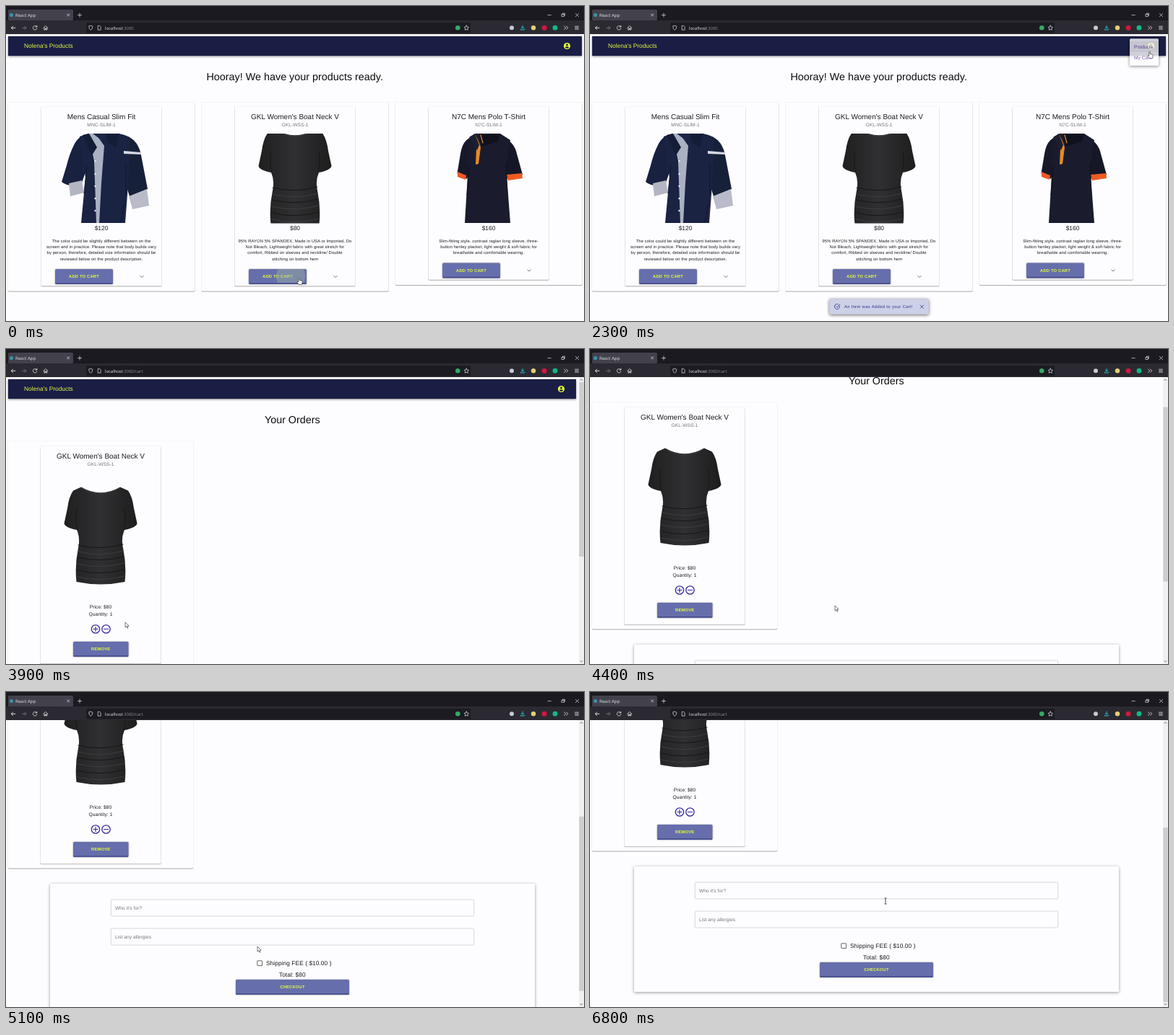
Animation of 800x437 px, one loop 6.9 s. Source, as an HTML page:

```html
<!DOCTYPE html>
<html lang="en">
<head>
<meta charset="utf-8">
<title>Shop demo</title>
<style>
  html, body { margin: 0; width: 100%; height: 100%; overflow: hidden; background: #fdfdff; }
  svg { display: block; width: 100vw; height: 100vh; }
  text { font-family: "Liberation Sans", Arial, sans-serif; text-rendering: geometricPrecision; white-space: pre; }
  .ui { font-family: "Open Sans", "Noto Sans", sans-serif; }
  .form { fill: #fdfdff; filter: drop-shadow(0 1px 2px rgba(0, 0, 0, .4)); }
  .bar { fill: #1a1e45; filter: drop-shadow(0 1px 1.5px rgba(0, 0, 0, .5)); }
  .btn { fill: #666fac; filter: drop-shadow(0 .8px 1px rgba(0, 0, 0, .4)); }
  .pop { filter: drop-shadow(0 1.6px 2.2px rgba(0, 0, 0, .6)); }
  .line { fill: none; stroke-linecap: round; stroke-linejoin: round; }
</style>
</head>
<body>
<svg id="stage" viewBox="0 0 800 437" preserveAspectRatio="none" xmlns="http://www.w3.org/2000/svg"></svg>
<script>
const LOOP = 6900, STEP = 100;
const LIME = '#e2f93c', INK = '#1d1d20', GREY = '#77777b';

const text = (s, x, y, size, fill = INK, extra = '') =>
  `<text x="${x}" y="${y}" font-size="${size}" fill="${fill}" ${extra}>${s}</text>`;
const mid = (s, x, y, size, fill = INK, extra = '') =>
  text(s, x, y, size, fill, `text-anchor="middle" ${extra}`);
const rect = (x, y, w, h, attrs = '') =>
  `<rect x="${x}" y="${y}" width="${w}" height="${h}" ${attrs}/>`;
const dot = (x, y, r, fill) => `<circle cx="${x}" cy="${y}" r="${r}" fill="${fill}"/>`;
const line = (d, color, w = .9) => `<path class="line" d="${d}" stroke="${color}" stroke-width="${w}"/>`;
const shape = (d, fill) => `<path d="${d}" fill="${fill}"/>`;

// Card with a faint edge and a firmer shadow below
const paper = (x, y, w, h) =>
  rect(x - .5, y - .2, w + 1, h + 1.4, 'rx="1.6" fill="#000" opacity=".1"') +
  rect(x, y + 2, w, h - 1.1, 'rx="1.4" fill="#000" opacity=".22"') +
  rect(x, y, w, h, 'rx="1.4" fill="#fdfdff"');

const button = (label, x, y, w, h = 21) =>
  rect(x, y, w, h, 'rx="1.6" class="btn"') +
  rect(x + .4, y + h - 2, w - .8, 1.8, 'rx="1" fill="#49518f"') +
  mid(label, x + w / 2, y + 12.4, 5.83, LIME, 'font-weight="bold" letter-spacing=".17"');

const account = (x, y) =>
  dot(x, y, 4.6, LIME) + dot(x, y - 1.5, 1.4, '#1a1e45') +
  shape(`M${x - 2.8} ${y + 2.1}Q${x} ${y - .5} ${x + 2.8} ${y + 2.1}Q${x} ${y + 4.6} ${x - 2.8} ${y + 2.1}Z`, '#1a1e45');

const appBar = right =>
  rect(3, 42, right - 3, 27, 'class="bar"') +
  text("Nolena's Products", 25, 58.4, 8.4, LIME) + account(right - 20.5, 55.5);

// Garments
const jacket = `
  ${shape('M104 181C95 186 89 203 84 221L77 244Q87 252 104 248L113 222Z', '#182140')}
  ${shape('M160 178C177 182 184 192 187 207L196 254 171 264 160 228Z', '#172039')}
  ${shape('M102 181L114 177H157L171 182 170 235 165 301H104L110 238Z', '#1a2342')}
  ${shape('M87 246L105 242 108 259 89 264Z', '#b3b6c2')}
  ${shape('M170 264L195 254 198 277 175 282Z', '#b9bcc8')}
  ${shape('M114 177H124L136 194 132 245 129 301H125L122 215Z', '#aab1c2')}
  ${shape('M120 177H138L135 188Z', '#1b2546')}
  ${shape('M106 179L115 177 126 196 119 207Z', '#141c36')}
  ${shape('M138 177H156L152 196 141 188Z', '#141c36')}
  ${shape('M163 201L187 203 187 206 163 205Z', '#d5d8e2')}
  ${line('M112 222L108 260M166 220L166 262M160 298L163 275', '#0e152b', .9)}
  ${[215, 233, 250, 267, 284].map(y => dot(123.5, y, 1.2, '#e6e8ee')).join('')}`;

const folds = [272, 281, 289, 298, 307, 316]
  .map((y, i) => line(`M${100 - i * .3} ${y}Q131 ${y + 8} ${162 + i * .3} ${y - 1}`, i % 2 ? '#3d3d3f' : '#161617', 1)).join('');
const blouse = `
  ${shape('M104 191.5Q131 207 158 191.5L169 196.5Q175 205 177 221L181.5 242Q180 248 164 251Q159 262 162 276Q167 300 164.5 323Q131 330 97.5 323Q95 300 100 276Q103 262 98 251Q82 248 80.5 242L85 221Q87 205 93 196.5Z', 'url(#cloth)')}
  ${line('M104.5 192.5Q131 208 157.5 192.5', '#49494b', .8)}
  ${line('M99 250Q95 236 98 222M163 250Q167 236 164 222', '#171718', 1)}
  ${folds}`;

const polo = `
  ${shape('M644 182Q632 186 629 205L624.5 232 638 240 648 212Z', '#17192a')}
  ${shape('M686 182Q703 187 707 205L715 234 694 240 684 214Z', '#151727')}
  ${shape('M640 185L650 177H684L698 186 692 222 698 301H635L639 235Z', '#1a1c2d')}
  ${shape('M625 230L637 235 636 241 625 237Z', '#ee5a22')}
  ${shape('M693 234L714 232 715 239 695 242Z', '#ee5a22')}
  ${shape('M650 179L655 190 657 196 654 219 650 220 651 198Z', '#e58a2c')}
  ${shape('M641 182L649 177 655 193 652 200Z', '#1d1f31')}
  ${shape('M655 177H684L681 188 659 195Z', '#10111f')}
  ${line('M657 179L660 190', '#e58a2c', 1.2)}
  ${line('M641 222L638 262M692 222L694 262', '#0d0e18', .8)}`;

// Product page
const products = [
  { x: 3, h: 263, name: 'Mens Casual Slim Fit', code: 'MNC-SLIM-1', price: '$120', art: jacket,
    about: ['The color could be slightly different between on the', 'screen and in practice. Please note that body builds vary',
      'by person, therefore, detailed size information should be', 'reviewed below on the product description.'] },
  { x: 271, h: 263, name: "GKL Women's Boat Neck V", code: 'GKL-WSS-1', price: '$80',
    art: `<g transform="translate(269 -20)">${blouse}</g>`,
    about: ['95% RAYON 5% SPANDEX, Made in USA or Imported, Do', 'Not Bleach, Lightweight fabric with great stretch for',
      'comfort, Ribbed on sleeves and neckline/ Double', 'stitching on bottom hem'] },
  { x: 539, h: 254.5, name: 'N7C Mens Polo T-Shirt', code: 'N7C-SLIM-1', price: '$160', art: polo,
    about: ['Slim-fitting style, contrast raglan long sleeve, three-', 'button henley placket, light weight &amp; soft fabric for',
      'breathable and comfortable wearing.'] }
];

function productCard({ x, h, name, code, price, art, about }) {
  const c = x + 129, by = 102 + h;
  return paper(x, 133.5, 258.5, h - 1) + paper(x + 45.7, 139.3, 166.5, h - 14) +
    mid(name, c, 156.6, 10) + mid(code, c, 166.6, 6.67, GREY, 'letter-spacing=".06"') +
    `<g clip-path="url(#photo)">${art}</g>` + mid(price, c, 311, 8.4) +
    about.map((s, i) => mid(s, c, 327.6 + i * 8.37, 5.83, INK, 'letter-spacing=".1"')).join('') +
    button('ADD TO CART', x + 65, by, 80) +
    line(`M${x + 182.8} ${by + 9.4}l2.2 2.2 2.2-2.2`, '#666', .9);
}

const snackbar = `<g id="snack">
  ${rect(331.3, 406.3, 137.5, 21.4, 'rx="2" class="pop" fill="#cdd1e7"')}
  ${line('M345.5 416.2A3.6 3.6 0 1 1 343.7 413.8M340.5 416.6L342 418.2 345.8 414', '#2c3488', .8)}
  ${text('An Item was Added to your Cart!', 352, 419.2, 5.83, '#2c3488', 'letter-spacing=".36"')}
  ${line('M457.2 415l4.4 4.4M461.6 415l-4.4 4.4', '#2c3488', .8)}</g>`;

const shop = appBar(797) + mid('Hooray! We have your products ready.', 399.7, 103.3, 14.37, '#0c0c0e') +
  products.map(productCard).join('') +
  `<g id="press" clip-path="url(#pressed)">${dot(394, 375, 20, 'rgba(160,178,160,.42)')}</g>` + snackbar;

// Cart page
const round = (x, d) =>
  `<circle cx="${x}" cy="388.5" r="5.7" fill="none" stroke="#35299b" stroke-width="1.3"/>` + line(d, '#35299b', 1.2);
const field = (id, label, y) =>
  rect(145.3, y, 502.4, 23, `id="${id}" rx="1.5" fill="none" stroke="#c6c6c9" stroke-width=".7"`) +
  text(label, 151, y + 13.8, 6.67, GREY, 'letter-spacing=".03"');

const cart = `<g id="scroll">${appBar(789)}
  ${mid('Your Orders', 396.3, 103.3, 14.3, '#0c0c0e')}
  ${paper(3, 128, 256, 314.5)}${paper(47.7, 134.5, 166.7, 301.7)}
  ${mid("GKL Women's Boat Neck V", 131, 151.6, 10)}
  ${mid('GKL-WSS-1', 131, 162, 6.67, GREY, 'letter-spacing=".06"')}
  ${blouse}
  ${mid('Price: $80', 131, 360, 6.67, INK, 'letter-spacing=".06"')}
  ${mid('Quantity: 1', 131, 370.2, 6.67, INK, 'letter-spacing=".06"')}
  ${round(124, 'M121 388.5h6M124 385.5v6')}${round(138.5, 'M135.5 388.5h6')}
  ${button('REMOVE', 93, 406, 76.5)}
  ${rect(61, 464, 671, 174, 'rx="1.5" class="form"')}
  ${field('who', "Who it's for?", 486)}${field('list', 'List any allergies', 526)}
  ${rect(347.8, 570.8, 6.8, 6.8, 'rx=".6" fill="none" stroke="#555" stroke-width=".9"')}
  ${text('Shipping FEE ( $10.00 )', 360, 577, 8.33, INK, 'letter-spacing=".07"')}
  ${mid('Total: $80', 396.3, 592.7, 8.33, INK, 'letter-spacing=".06"')}
  ${button('CHECKOUT', 318, 597, 157)}</g>
  ${rect(793, 39, 7, 398, 'fill="#f0f0f1"')}
  ${rect(793.3, 46, 6.4, 242, 'id="thumb" fill="#cdcdce"')}
  ${line('M795 43.4l1.5-1.6 1.5 1.6M795 432.6l1.5 1.6 1.5-1.6', '#505050', .8)}`;

const menu = `<g id="menu">
  ${rect(747, 45.3, 40, 37.5, 'rx="1.6" class="pop" fill="#fdfdff"')}
  ${rect(747, 49, 40, 15, 'id="row1" fill="rgba(0,0,0,.05)"')}
  ${rect(747, 64, 40, 15, 'id="row2" fill="rgba(0,0,0,.05)"')}
  <circle id="ripple" cx="767" cy="72" r="8" fill="rgba(63,81,181,.26)"/>
  <g id="links">${text('Products', 753, 59, 6.67, 'inherit')}${text('My Cart', 753, 74, 6.67, 'inherit')}</g></g>`;

// Browser frame
const W = '#e9e9ee';
const browser = rect(0, 0, 800, 20.5, 'fill="#1b1a21"') + rect(0, 20, 800, 19, 'fill="#2b2a32"') +
  rect(3, 5, 90, 15, 'rx="1.6" fill="#42414c"') + dot(7.5, 12.5, 2.6, '#3f8fa6') +
  text('React App', 13, 15, 6, W, 'class="ui"') +
  line('M84.6 10.8l3.2 3.2M87.8 10.8l-3.2 3.2M102 10v5.2M99.4 12.6h5.2', W, .7) +
  line('M750 12.6h4.2M769.3 11.4h3v3h-3zM770.4 11.2v-1h3v3h-1M788.4 10.4l4.2 4.2M792.6 10.4l-4.2 4.2', W, .7) +
  line('M12.8 30.3H7.4M9.6 28l-2.3 2.3 2.3 2.3', W, .9) +
  line('M22.4 30.3h5.4M25.6 28l2.3 2.3-2.3 2.3', '#77767f', .9) +
  line('M42.5 28.8A2.8 2.8 0 1 0 42.8 31.2M42.8 27.2v1.9h-1.9', W, .8) +
  line('M52 30.2l2.8-2.7 2.8 2.7M52.8 30v3h1.4v-2h1.2v2h1.4v-3', W, .8) +
  rect(111, 23, 532, 14.5, 'rx="1.6" fill="#1c1b22"') +
  line('M117.3 27.3l2.5.9c0 2.6-.7 4.2-2.5 5.1-1.8-.9-2.5-2.5-2.5-5.1z', W, .7) +
  line('M127.6 27.4h2l1.5 1.5v4.3h-3.5z', W, .7) +
  `<text class="ui" x="137" y="32.5" font-size="5.9" fill="${W}">localhost<tspan fill="#8f8f98">:3000<tspan id="path"></tspan></tspan></text>` +
  dot(625.3, 30.2, 3.3, '#36a866') +
  line('M637.3 27l1 2.1 2.3.3-1.7 1.6.4 2.3-2-1.1-2 1.1.4-2.3-1.7-1.6 2.3-.3z', W, .7) +
  dot(700, 30.2, 3, '#c9c9d0') + line('M715 27.2v3.8M713.4 29.5l1.6 1.6 1.6-1.6M712.3 32v1h5.4v-1', '#2fc9cf', .9) +
  dot(730, 30.2, 3.2, '#e2d074') + dot(745, 30.2, 3.5, '#d3173d') + dot(760, 30.2, 3.4, '#12b886') +
  line('M772.6 28l2.1 2.2-2.1 2.2M775.6 28l2.1 2.2-2.1 2.2M787.6 28.2h4.8M787.6 30.2h4.8M787.6 32.2h4.8', W, .8);

const status = `<g id="status">${rect(0, 429, 45.5, 8, 'rx="1" fill="#2b2a32"')}
  ${text('localhost:3000/cart', 1.4, 435, 5, W, 'class="ui"')}</g>`;

const cursors = `<g id="mouse" stroke="#222" stroke-width=".6" stroke-linejoin="round" fill="#fff">
  <path id="arrow" d="M0 0V7.2L1.7 5.7 2.9 8.3 4 7.8 2.8 5.2H5.1Z"/>
  <path id="hand" d="M-.2 .5Q.6-.3 1.2.6V3.6L4.4 4.2Q5.3 4.5 5.2 5.5L4.5 9.5H.4L-2.4 6Q-2 4.9-.2 6Z"/>
  <path id="beam" d="M-1.5-4H1.5M0-4V4M-1.5 4H1.5" fill="none" stroke-width=".8"/></g>`;

document.getElementById('stage').innerHTML = `<defs>
  <linearGradient id="cloth"><stop offset="0" stop-color="#1f1f20"/><stop offset=".5" stop-color="#303032"/><stop offset="1" stop-color="#1d1d1e"/></linearGradient>
  <clipPath id="photo">${rect(0, 177, 800, 124.5)}</clipPath>
  <clipPath id="pressed">${rect(336, 365, 80, 19)}</clipPath></defs>
  ${rect(0, 0, 800, 437, 'fill="#fdfdff"')}
  <g id="shop">${shop}</g><g id="cart">${cart}</g>${menu}${browser}${status}${cursors}`;

// Motion: rows of [time, values...]
const pointer = [
  [0, 405, 377], [100, 407, 374], [300, 470, 310], [600, 547, 225], [700, 551, 219], [900, 590, 190],
  [1200, 705, 112], [1400, 749, 80], [1800, 774, 54], [2000, 774, 54], [2300, 774, 63], [2600, 770, 72],
  [2900, 769, 72], [3100, 690, 105], [3400, 452, 211], [3600, 310, 300], [3900, 165, 379],
  [4200, 310, 370], [4400, 339, 356], [5100, 348, 353], [5300, 349, 350], [5400, 349, 350],
  [5800, 384, 372], [6100, 404, 391], [6300, 406, 398], [6600, 408, 315], [6800, 409, 290]
];
const scrolling = [[4200, 0], [4400, 54], [4800, 144], [5100, 198], [5300, 222]];
const cursorAt = [[0, 'hand'], [100, 'arrow'], [1700, 'hand'], [3000, 'arrow'], [5900, 'hand'],
  [6300, 'arrow'], [6400, 'hand'], [6500, 'arrow'], [6600, 'beam'], [6700, 'arrow'], [6800, 'beam']];

const $ = id => document.getElementById(id);
const show = (id, on) => $(id).setAttribute('opacity', +on);
const ramp = (t, a, b) => Math.min(1, Math.max(0, (t - a) / (b - a)));

function track(rows, t) {
  const i = rows.findIndex(r => r[0] > t);
  if (i === 0) return rows[0].slice(1);
  if (i < 0) return rows[rows.length - 1].slice(1);
  const a = rows[i - 1], b = rows[i], k = ramp(t, a[0], b[0]);
  return a.slice(1).map((v, n) => v + (b[n + 1] - v) * k);
}

function draw(t) {
  const inCart = t >= 2850;
  $('shop').style.display = inCart ? 'none' : '';
  $('cart').style.display = inCart ? '' : 'none';
  $('path').textContent = inCart ? '/cart' : '';

  show('press', 1 - ramp(t, 0, 400));
  const grow = ramp(t, 100, 400), s = .75 + .25 * grow;
  show('snack', grow);
  $('snack').setAttribute('transform', `translate(400 417) scale(${s}) translate(-400 -417)`);

  show('menu', ramp(t, 2060, 2360) * (1 - ramp(t, 3000, 3250)));
  show('row1', t < 2450);
  show('row2', t >= 2450);
  show('ripple', t >= 2700 ? 1 - ramp(t, 2900, 3100) : 0);
  $('links').setAttribute('fill', inCart ? '#3a45b5' : '#6a3fa5');
  show('status', t >= 2500 && t < 3200);

  const [top] = track(scrolling, t);
  $('scroll').setAttribute('transform', `translate(0 ${-top})`);
  $('thumb').setAttribute('y', 46 + top * .64);

  const [x, y] = track(pointer, t);
  const kind = cursorAt.filter(r => r[0] <= t).pop()[1];
  const overList = kind === 'beam' && y > 526 - top && y < 549 - top;
  const overWho = kind === 'beam' && y < 509 - top;
  $('list').setAttribute('stroke', overList ? '#333' : '#c6c6c9');
  $('who').setAttribute('stroke', overWho ? '#333' : '#c6c6c9');
  $('mouse').setAttribute('transform', `translate(${x} ${y})`);
  for (const id of ['arrow', 'hand', 'beam']) show(id, id === kind);
}

function frame() {
  draw(Math.floor(performance.now() % LOOP / STEP) * STEP);
  requestAnimationFrame(frame);
}
frame();
</script>
</body>
</html>
```
